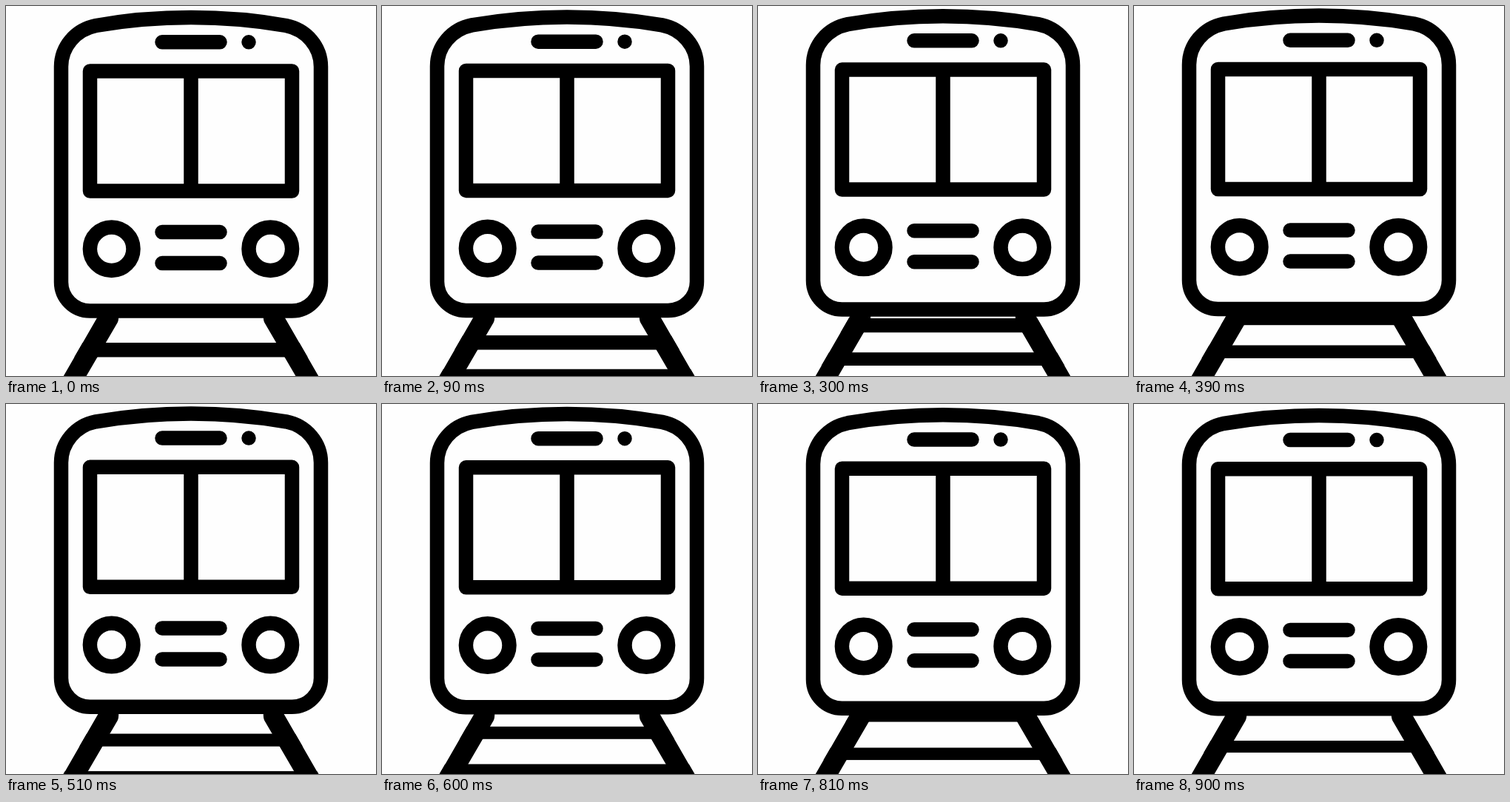
Write an HTML page that moves like this. It is 500 px wide and 500 px high and loops after 0.93 s.

```html
<!DOCTYPE html>
<html lang="en">
<head>
<meta charset="utf-8">
<title>Train on tracks</title>
<style>
  html, body { margin: 0; width: 100%; height: 100%; overflow: hidden; background: #fefefe; }
  svg { display: block; width: 100vw; height: 100vh; }
</style>
</head>
<body>
<svg viewBox="0 0 500 500">
  <defs>
    <clipPath id="bed"><path d="M124.5 419 77.5 500H422.5L375.5 419Z"/></clipPath>
    <path id="rail" d="M125 418 77.8 500H108.6L150.6 428Q152.4 425 152.2 418Z"/>
  </defs>
  <rect width="500" height="500" fill="#fefefe"/>
  <use href="#rail"/>
  <use href="#rail" transform="matrix(-1 0 0 1 500 0)"/>
  <g id="ties" clip-path="url(#bed)"></g>
  <g id="train" fill="none" stroke="#000" stroke-width="19.5" stroke-linecap="round" stroke-linejoin="round">
    <path fill="#fefefe" d="M74.5 82C74.5 55 94 32 121.5 26.5Q184 15.6 250 15.6T378.500 26.500C406 32 425.500 55 425.500 82V373A39 39 0 0 1 386.500 412H113.500A39 39 0 0 1 74.500 373Z"/>
    <path d="M113.500 88H386.500V250H113.500ZM250 88V250"/>
    <path d="M211 48.800H289M211 305.600H289M211 347.600H289M328 48.800h.01"/>
    <circle cx="142.700" cy="328.200" r="29.300"/>
    <circle cx="357.300" cy="328.200" r="29.300"/>
  </g>
</svg>
<script>
const LOOP = 930, STEP = 30, LIFT = 3;

// Each tie: top and bottom edge at time 0, and their upward speeds in px/ms.
const ties = [
  { top: 455, topSpeed: 0.110, end: 474.5, endSpeed: 0.111 },
  { top: 500.4, topSpeed: 0.1075, end: 519.2, endSpeed: 0.1107 },
  { top: 550, topSpeed: 0.1056, end: 571, endSpeed: 0.111 }
];

const train = document.getElementById('train');
const bed = document.getElementById('ties');
for (const tie of ties) {
  tie.el = document.createElementNS('http://www.w3.org/2000/svg', 'rect');
  tie.el.setAttribute('x', 70);
  tie.el.setAttribute('width', 360);
  bed.append(tie.el);
}

function draw(t) {
  const lift = LIFT * (1 - Math.abs(1 - 2 * t / LOOP));
  train.setAttribute('transform', `translate(0 ${-lift})`);
  for (const tie of ties) {
    const y = tie.top - tie.topSpeed * t;
    tie.el.setAttribute('y', y);
    tie.el.setAttribute('height', tie.end - tie.endSpeed * t - y);
  }
}

const start = performance.now();
function tick() {
  const t = (performance.now() - start) % LOOP;
  draw(Math.floor(t / STEP) * STEP);
  requestAnimationFrame(tick);
}
tick();
</script>
</body>
</html>
```
